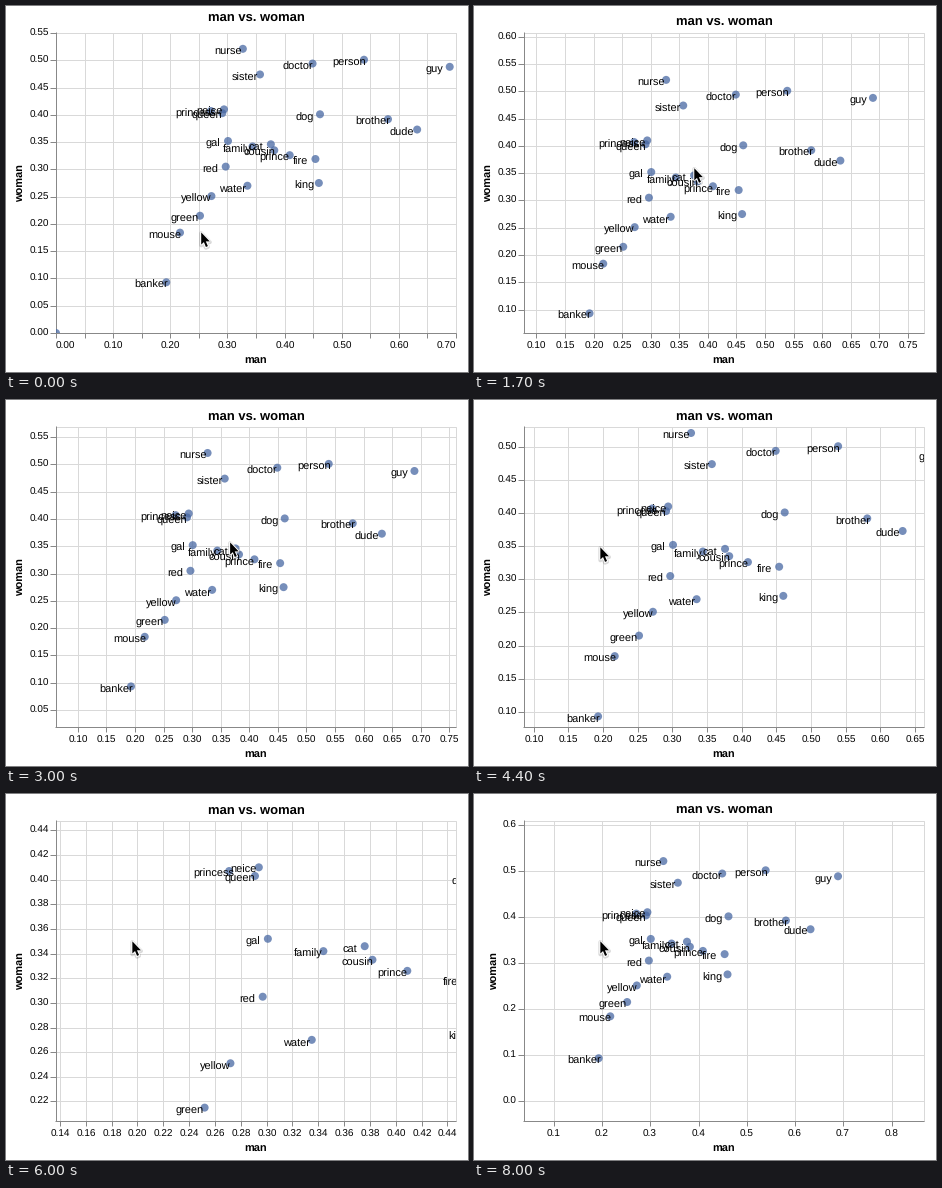
Recreate the animation shown at these times as a matplotlib script. Size 462 by 366 pixels, loop 8.1 s.

```python
import math

import matplotlib.pyplot as plt
import numpy as np
from matplotlib.animation import FuncAnimation
from matplotlib.patches import Circle, Polygon, Rectangle
from matplotlib.transforms import Bbox, TransformedBbox

WIDTH, HEIGHT, DPI = 462, 366, 64
PX = 72 / DPI  # points per pixel
LEFT, TOP, RIGHT, BOTTOM = 50, 27, 450, 327
X_UNIT, Y_UNIT = 400 / 0.7, 300 / 0.55
ANCHOR = np.array([126, 145])  # zoom centre
STEP_MS, FRAMES = 100, 81
GRID, AXIS = "#d9d9d9", "#888888"

WORDS = {
    "": (0, 0), "nurse": (.327, .521), "person": (.539, .501),
    "doctor": (.449, .494), "guy": (.689, .488), "sister": (.357, .474),
    "neice": (.294, .410), "princess": (.271, .407), "queen": (.291, .403),
    "dog": (.462, .401), "brother": (.581, .392), "dude": (.632, .373),
    "gal": (.301, .352), "family": (.344, .342), "cat": (.376, .346),
    "cousin": (.382, .335), "prince": (.409, .326), "fire": (.454, .319),
    "red": (.297, .305), "king": (.460, .275), "water": (.335, .270),
    "yellow": (.272, .251), "green": (.252, .215), "mouse": (.217, .184),
    "banker": (.193, .093),
}
ARROW = np.array([(1.2, 2.4), (1.2, 14.6), (3.9, 12.1), (5.9, 17),
                  (7.9, 16.1), (5.8, 11.4), (9.8, 11.4)])

plt.rcParams.update({"font.family": "Liberation Sans", "text.hinting": "none"})
fig = plt.figure(figsize=(WIDTH / DPI, HEIGHT / DPI), dpi=DPI, facecolor="white")
ax = fig.add_axes([0, 0, 1, 1])
plot_box = TransformedBbox(Bbox([[LEFT, TOP], [RIGHT, BOTTOM]]), ax.transData)


def progress(t, start, end):
    return min(max((t - start) / (end - start), 0), 1)


def ease(t, start, end):
    u = progress(t, start, end)
    return u * u * (3 - 2 * u)


def pan_at(t):
    """Drag out, part of the way back, then off to the lower left."""
    swing = ease(t, 500, 1300) - .575 * ease(t, 1400, 2300)
    return np.array([-52.6, 36.5]) * swing + np.array([-13.5, -5.6]) * ease(t, 2300, 3100)


def zoom_at(t):
    """Scroll in with a small extra push, then out with a long tail."""
    zoom_in = .748 * ease(t, 3925, 5350) + .067 * ease(t, 5500, 6000)
    zoom_out = .984 * (1 - (1 - progress(t, 6700, 8000)) ** 1.375)
    return math.exp(zoom_in - zoom_out)


def pointer_at(t):
    return (np.array([194, 224]) + np.array([68, -94]) * ease(t, 100, 400)
            + pan_at(t + 40)  # the plot trails the pointer slightly
            + np.array([-22, 0]) * ease(t, 2900, 3300)
            + np.array([-79, 5]) * ease(t, 3400, 3700))


def nice_ticks(low, high, count):
    raw = (high - low) / count
    power = 10 ** math.floor(math.log10(raw))
    factor = next((f for f, limit in ((10, 50), (5, 10), (2, 2))
                   if raw / power >= math.sqrt(limit)), 1)
    step = factor * power
    first, last = math.ceil(low / step - 1e-9), math.floor(high / step + 1e-9)
    decimals = max(0, -math.floor(math.log10(step) + 1e-9))
    return [n * step for n in range(first, last + 1)], decimals


def write(x, y, text, size, **style):
    return ax.text(x, y, text, fontsize=size * PX,
                   **{"ha": "center", "va": "baseline", "color": "black", **style})


def x_labels(ticks, decimals, to_x):
    """Flush labels at the edges, then drop every other one while they collide."""
    width = 10 * (0.834 + 0.556 * decimals)
    labels = []
    for value in ticks:
        x = to_x(value)
        align, start = "center", x - width / 2
        if abs(x - LEFT) < 1:
            align, start = "left", x
        elif abs(x - RIGHT) < 1:
            align, start = "right", x - width
        labels.append((x, align, start, f"{value:.{decimals}f}"))
    while any(b[2] < a[2] + width for a, b in zip(labels, labels[1:])):
        labels = labels[::2]
    for x, align, _, text in labels:
        write(x, 343, text, 10, ha=align)


def draw_axes(to_x, to_y, x_range, y_range):
    x_ticks, x_decimals = nice_ticks(*x_range, 10)
    y_ticks, y_decimals = nice_ticks(*y_range, 8)
    snap_x = lambda v: math.floor(to_x(v) + .5)
    snap_y = lambda v: math.floor(to_y(v) + .5)
    xs = [snap_x(v) - .5 for v in x_ticks]
    ys = [snap_y(v) - .5 for v in y_ticks]

    ax.add_patch(Rectangle((LEFT - .5, TOP - .5), RIGHT - LEFT, BOTTOM - TOP,
                           fill=False, ec=GRID, lw=PX, zorder=1))
    ax.vlines(xs, TOP, BOTTOM, color=GRID, lw=PX, zorder=1)
    ax.hlines(ys, LEFT, RIGHT, color=GRID, lw=PX, zorder=1)
    ax.vlines(xs, BOTTOM, BOTTOM + 5, color=AXIS, lw=PX, zorder=2)
    ax.hlines(ys, LEFT - 6, LEFT, color=AXIS, lw=PX, zorder=2)
    ax.vlines([LEFT - .5], TOP - 1, BOTTOM, color=AXIS, lw=PX, zorder=2)
    ax.hlines([BOTTOM - .5], LEFT - 1, RIGHT, color=AXIS, lw=PX, zorder=2)

    x_labels(x_ticks, x_decimals, snap_x)
    for value, y in zip(y_ticks, ys):
        write(43, y + 3.5, f"{value:.{y_decimals}f}", 10, ha="right")

    # Titles make room for the axis labels.
    lift = max(0, TOP - (min(ys) - 4.5))
    write(250, 19.4 - lift, "man vs. woman", 13, weight="bold")
    write(250, 358, "man", 11, weight="bold")
    write(18 if y_decimals > 1 else 23.5, 177, "woman", 11, weight="bold",
          rotation=90, rotation_mode="anchor")


def draw_words(to_x, to_y):
    for word, (a, b) in WORDS.items():
        x, y = to_x(a), to_y(b)
        if not (LEFT - 30 < x < RIGHT + 60 and TOP - 20 < y < BOTTOM + 20):
            continue
        dot = ax.add_patch(Circle((x, y), 4, fc="#4868a3", ec="none", alpha=.75, zorder=3))
        label = write(x - 15, y + 6, word, 11, zorder=4, clip_on=True)
        for artist in (dot, label):
            artist.set_clip_box(plot_box)


def draw_pointer(position):
    shape = ARROW + position
    ax.add_patch(Polygon(shape + (0, .8), fc="none", ec="black", alpha=.15,
                         lw=4 * PX, joinstyle="round", zorder=5))
    ax.add_patch(Polygon(shape, fc="white", ec="white", lw=2 * PX,
                         joinstyle="miter", zorder=6))
    ax.add_patch(Polygon(shape, fc="black", ec="none", zorder=7))


def draw(frame):
    t = frame * STEP_MS
    ax.cla()
    ax.set_xlim(0, WIDTH)
    ax.set_ylim(HEIGHT, 0)
    ax.axis("off")

    zoom = zoom_at(t)
    x0, y0 = ANCHOR + zoom * (np.array([LEFT, BOTTOM]) + pan_at(t) - ANCHOR)
    x_scale, y_scale = zoom * X_UNIT, zoom * Y_UNIT
    to_x = lambda v: x0 + x_scale * v
    to_y = lambda v: y0 - y_scale * v

    draw_axes(to_x, to_y,
              ((LEFT - x0) / x_scale, (RIGHT - x0) / x_scale),
              ((y0 - BOTTOM) / y_scale, (y0 - TOP) / y_scale))
    draw_words(to_x, to_y)
    draw_pointer(pointer_at(t))
    return []


animation = FuncAnimation(fig, draw, frames=FRAMES, interval=STEP_MS,
                          init_func=lambda: [], repeat=True, repeat_delay=0)
plt.show()
```
